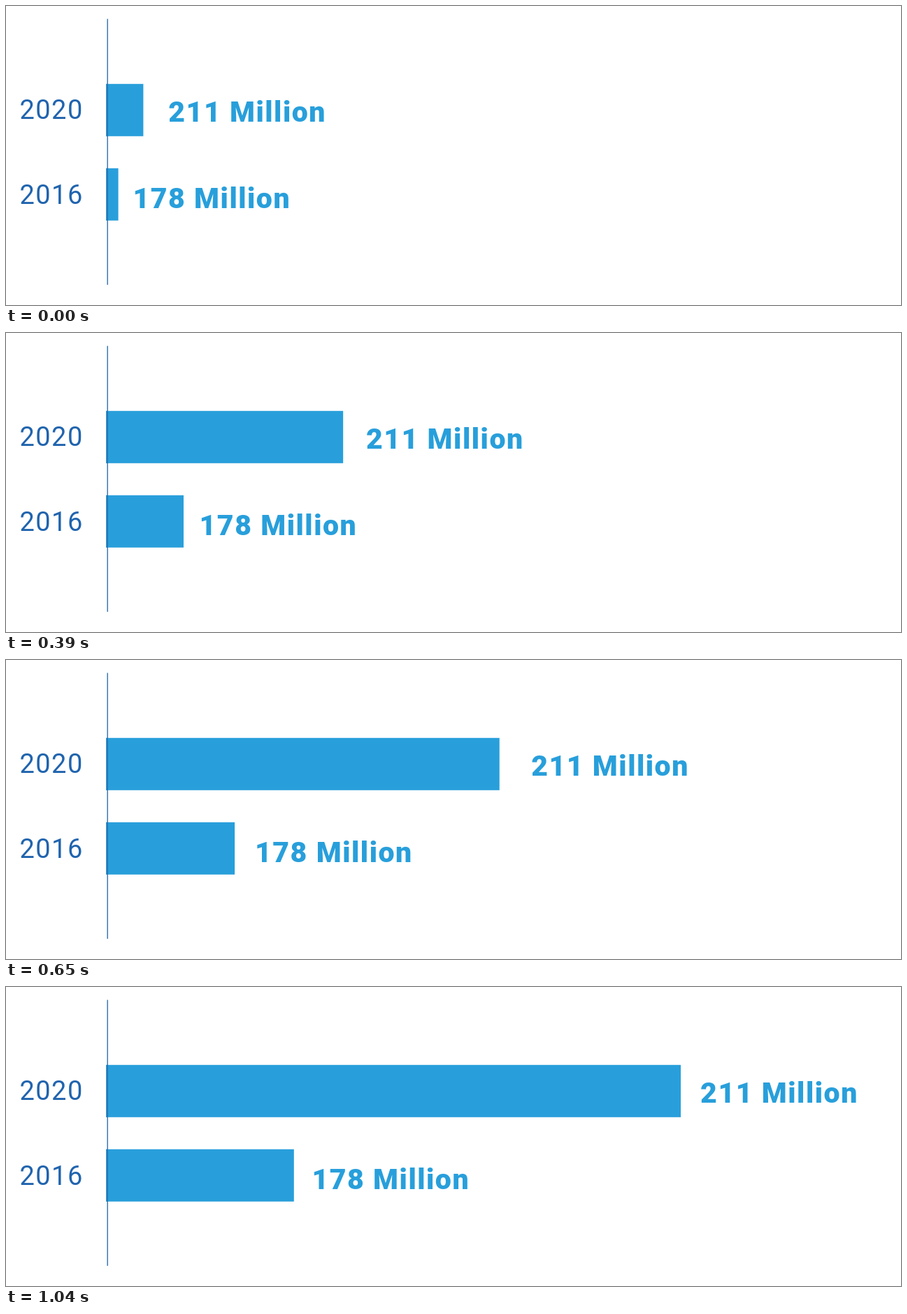
An HTML page for the animation above (6170 ms loop, 1280 by 429 pixels).

```html
<!DOCTYPE html>
<html lang="en">
<head>
<meta charset="utf-8">
<title>Bar chart</title>
<style>
  html, body { margin: 0; width: 100%; height: 100%; overflow: hidden; background: #fff; }
  svg { display: block; width: 100vw; height: 100vh; }
  text { font-family: Roboto, sans-serif; }
  .year { font-size: 38px; letter-spacing: 1.5px; fill: #2064ae; }
  .value { font-size: 41px; font-weight: 900; letter-spacing: 1.55px; fill: #289fdb; }
  .bar { fill: #289fdb; }
  .edge { fill: #1c86c8; }
</style>
</head>
<body>
<svg viewBox="0 0 1280 429">
  <g id="rows"></g>
  <rect x="144.5" y="18.5" width="1.4" height="381.5" fill="#2f70ae"/>
</svg>
<script>
const LOOP = 6170, STEP = 130, STEPS = 8;
const LEFT = 143.3, HEIGHT = 75;

// [step, progress] key points shared by both rows
const grow = [[0, 0], [2, 0.2336], [4, 0.51], [5, 0.6627], [7, 0.8818], [8, 1]];
const slide = [[0, 0], [2, 0.235], [4, 0.508], [5, 0.682], [7, 0.895], [8, 1]];

// bar: right edge, label: text start, each as [first, last]
const rows = [
  { year: "2020", value: "211 Million", top: 111.8, yearY: 162, valueY: 165.6,
    bar: [196.4, 965], label: [232.3, 993.1] },
  { year: "2016", value: "178 Million", top: 232.8, yearY: 284, valueY: 289.8,
    bar: [160.6, 411.8], label: [181.4, 437.4] }
];

const holder = document.getElementById("rows");

function add(tag, attrs, content = "") {
  const node = document.createElementNS("http://www.w3.org/2000/svg", tag);
  for (const key in attrs) node.setAttribute(key, attrs[key]);
  node.textContent = content;
  return holder.appendChild(node);
}

const mix = ([a, b], p) => a + (b - a) * p;

function progress(keys, step) {
  const i = Math.max(1, keys.findIndex(([s]) => s >= step));
  const [s0, p0] = keys[i - 1], [s1, p1] = keys[i];
  return mix([p0, p1], (step - s0) / (s1 - s0));
}

for (const row of rows) {
  add("text", { class: "year", x: 19.4, y: row.yearY }, row.year);
  row.rect = add("rect", { class: "bar", x: LEFT, y: row.top, height: HEIGHT });
  add("rect", { class: "edge", x: LEFT, y: row.top, width: 2.6, height: HEIGHT });
  row.text = add("text", { class: "value", y: row.valueY }, row.value);
}

function draw(ms) {
  const step = Math.min(STEPS, Math.floor((ms % LOOP) / STEP));
  const grown = progress(grow, step), slid = progress(slide, step);
  for (const row of rows) {
    row.rect.setAttribute("width", mix(row.bar, grown) - LEFT);
    row.text.setAttribute("x", mix(row.label, slid));
  }
}

const start = performance.now();
function tick() {
  draw(performance.now() - start);
  requestAnimationFrame(tick);
}
draw(0);
requestAnimationFrame(tick);
</script>
</body>
</html>
```
